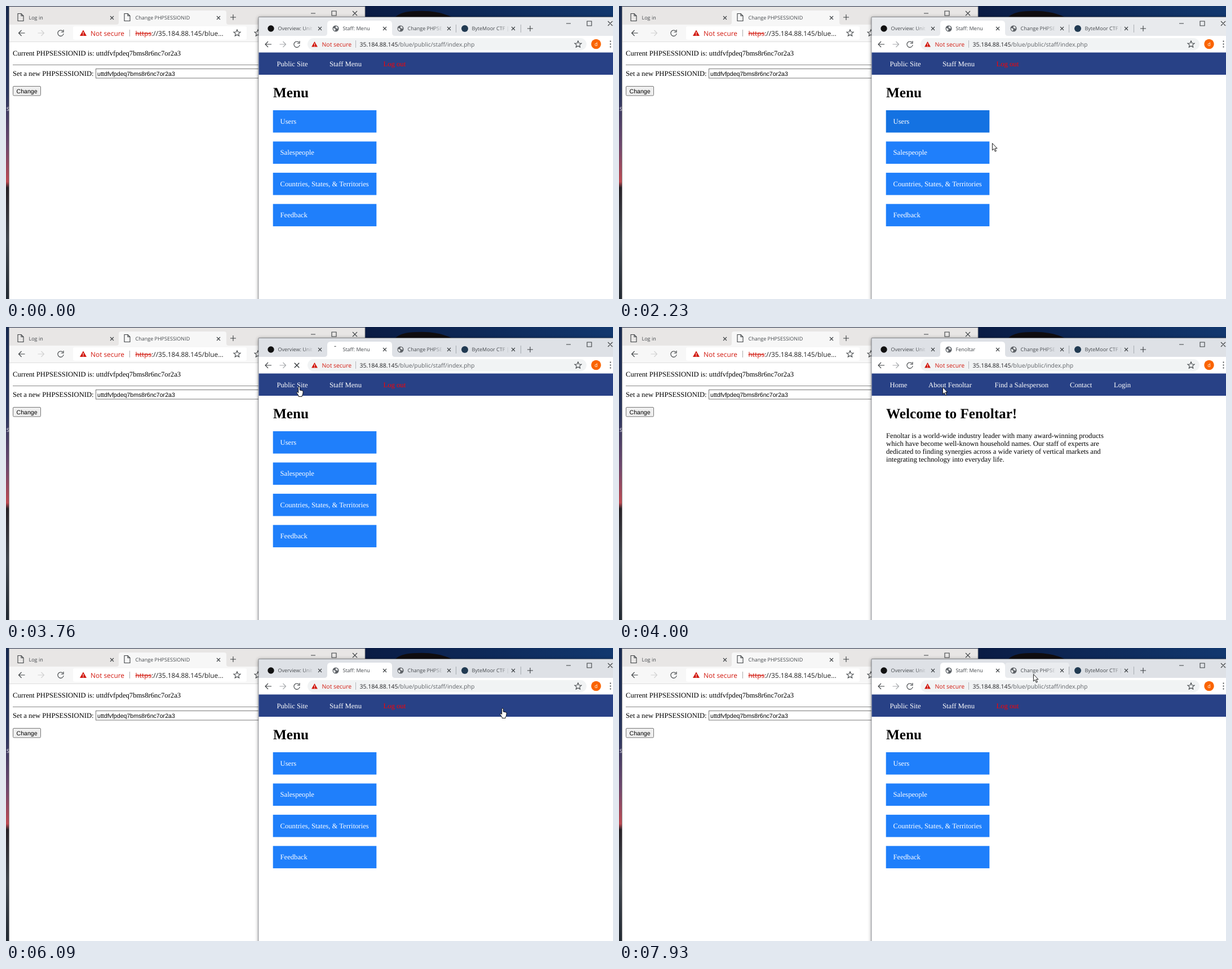
Animation, 1077 px wide and 520 px high, one loop 8000 ms. Source, as an HTML page:

```html
<!DOCTYPE html>
<html lang="en">
<head>
<meta charset="utf-8">
<title>Two browser windows</title>
<style>
  html, body { margin: 0; width: 100%; height: 100%; overflow: hidden; background: #fff; }
  svg { display: block; width: 100vw; height: 100vh; }
  text { white-space: pre; text-rendering: geometricPrecision; font: 12.65px "Liberation Serif", serif; }
  .ui text { font: 9px "Open Sans", sans-serif; fill: #45494d; }
  .ui .addr { font-size: 10.43px; fill: #5f6368; }
  .ui .edge { font-size: 11.9px; fill: #222; }
  .ui .warn { fill: #d2190f; }
  .ui .host { fill: #202124; }
  .ui .struck { fill: #d2190f; text-decoration: line-through; }
  .field text { font: 10.6px "Liberation Sans", sans-serif; }
  h1, .head { font-size: 25.2px; font-weight: bold; }
  .light text { fill: #fff; }
  .light .out { fill: #f00; }
  .line { fill: none; stroke: #3c4043; stroke-width: 1.1; }
  .win { filter: drop-shadow(0 1px 3px #0007); }
</style>
</head>
<body>
<svg viewBox="0 0 1077 520" preserveAspectRatio="none">
  <defs>
    <linearGradient id="sky"><stop offset=".58" stop-color="#0a1b43"/><stop offset="1" stop-color="#12386f"/></linearGradient>
    <linearGradient id="dusk" x2="0" y2="1">
      <stop offset="0" stop-color="#17294e"/><stop offset=".3" stop-color="#2b375f"/>
      <stop offset=".48" stop-color="#70496e"/><stop offset=".6" stop-color="#bd4a52"/>
      <stop offset=".62" stop-color="#282228"/><stop offset=".8" stop-color="#40464e"/><stop offset="1" stop-color="#232a33"/>
    </linearGradient>
    <linearGradient id="fade"><stop offset=".72" stop-color="#45494d"/><stop offset="1" stop-color="#45494d" stop-opacity=".1"/></linearGradient>
    <path id="x" d="M-3-3l6 6m0-6l-6 6"/>
    <path id="plus" d="M-5 0h10M0-5v10"/>
    <path id="back" d="M5.5 0h-11m5-5l-5 5 5 5"/>
    <path id="star" d="M0-6L1.7-2 6-1.7 2.7 1.1 3.7 5.2 0 3-3.7 5.2-2.7 1.1-6-1.7-1.7-2z"/>
    <path id="file" d="M-5-6.5h6l4 4v9h-10zM1-6.5v4h4"/>
    <g id="reload"><path d="M4.2-3A5.2 5.2 0 1 0 5.2 1"/><path d="M5-6v4.2H.8" /></g>
    <g id="alert"><path d="M0-5.5L6 5H-6z" fill="#d2190f"/><path d="M0-1.8v3.2m0 1.2v1.3" stroke="#fff" stroke-width="1.2"/></g>
    <g id="globe"><circle r="5.6" fill="#5f6368"/><path d="M-4.4-.8l3 .6 1.2 2-1.4 2.4q-2.8-1.4-2.8-5M.2-4.2l2.4.6 1.6 3-2.2.6-2.4-1.6z" fill="#f1f3f4"/></g>
    <g id="controls" class="line"><path d="M-41 0h8M-4-4h8v8h-8zM33-4l8 8m0-8l-8 8" style="stroke:inherit"/></g>
  </defs>

  <rect width="1077" height="520" fill="url(#sky)"/>
  <path d="M690 20Q702 9 728 9Q765 7 792 20z" fill="#100d10"/>
  <rect width="6" height="520" fill="url(#dusk)"/>
  <text x="1" y="186" style="font:9px 'Open Sans',sans-serif" fill="#fff">S</text>

  <g class="ui">
    <rect x="5.5" y="1" width="631.5" height="530" fill="#e8e6e5" stroke="#8c8c8c" stroke-width=".8"/>
    <path d="M6 33H196q4 0 4-4V12q0-4 4-4H387q4 0 4 4V29q0 4 4 4H637V64H6z" fill="#f7f7f7"/>
    <rect x="119" y="36" width="308" height="24" rx="3" fill="#fff"/>
    <rect x="6" y="64" width="631" height="456" fill="#fff"/>
    <path d="M6 63.5H448" stroke="#dedede"/>
    <g class="line">
      <use href="#file" x="26" y="20"/><use href="#file" x="215" y="20"/>
      <use href="#x" x="188" y="21"/><use href="#x" x="377" y="21"/><use href="#plus" x="403" y="20"/>
      <use href="#back" x="28" y="48"/><use href="#reload" x="97" y="48"/>
      <use href="#back" transform="translate(62 48) scale(-1 1)" stroke="#d0d0d0"/>
      <use href="#star" x="410" y="48"/><use href="#star" x="447" y="48"/>
    </g>
    <use href="#controls" x="582" y="13" stroke="#777"/>
    <text x="40.5" y="24">Log in</text>
    <text x="229.5" y="24">Change PHPSESSIONID</text>
    <use href="#alert" x="137" y="48"/>
    <text class="edge warn" x="150" y="53">Not secure</text>
    <path d="M219.5 42v12" stroke="#aaa"/>
    <text class="edge" x="229.5" y="53"><tspan class="struck">https</tspan>://35.184.88.145/blue...</text>
  </g>
  <text x="12" y="88">Current PHPSESSIONID is: uttdfvfpdeq7bms8r6nc7or2a3</text>
  <path d="M12 104.5H448" stroke="#888"/>
  <text x="12" y="123.500">Set a new PHPSESSIONID:</text>
  <g class="field">
    <rect x="159.500" y="111.500" width="320" height="16.500" fill="#fff" stroke="#767676"/>
    <text x="162" y="123.500">uttdfvfpdeq7bms8r6nc7or2a3</text>
    <rect x="12.500" y="142.500" width="49" height="16.500" rx="1.500" fill="#efefef" stroke="#767676"/>
    <text x="18.500" y="154.500">Change</text>
  </g>

  <g class="ui">
    <rect id="strip" class="win" x="448" y="19.500" width="640" height="510" fill="#e8eaed"/>
    <path d="M448 19.500H1077M448 20V520" stroke="#66696e" stroke-width=".7"/>
    <path id="glow" d="M685 53V31q0-5 5-5H794q5 0 5 5V53z" fill="#fff" opacity=".35"/>
    <path d="M448.500 53H565q5 0 5-5V32q0-6 6-6H679q6 0 6 6V48q0 5 5 5H1077V520H448.500z" fill="#fff"/>
    <rect id="omni" x="535" y="57" width="495" height="21.500" rx="10.700" fill="#f1f3f4"/>
    <circle cx="470" cy="40" r="5.700" fill="#111"/>
    <use id="icon" href="#globe" x="585" y="40"/>
    <path id="spin" d="M-1.500-5.500A5.700 5.700 0 0 1 1.500-5.500" class="line"/>
    <use href="#globe" x="700" y="40"/>
    <circle cx="814" cy="40" r="6" fill="#213a52"/>
    <text x="482.500" y="43" fill="url(#fade)" style="fill:url(#fade)">Overview: Unit</text>
    <text id="title" x="597.500" y="43"></text>
    <text x="712.500" y="43" style="fill:url(#fade)">Change PHPSE</text>
    <text x="826.500" y="43" style="fill:url(#fade)">ByteMoor CTF |</text>
    <g class="line">
      <use href="#x" x="557" y="40"/><use href="#x" x="672" y="40"/><use href="#x" x="786" y="40"/><use href="#x" x="900" y="40"/>
      <use href="#plus" x="930" y="40"/>
      <path d="M798.500 33v14M913.500 33v14" stroke="#999da3" stroke-width=".8"/>
      <use href="#back" x="465.500" y="68"/>
      <use href="#back" transform="translate(491 68) scale(-1 1)" stroke="#a5a8ab"/>
      <use id="reloadBtn" href="#reload" x="516" y="68"/>
      <use id="stopBtn" href="#x" transform="translate(516 68) scale(1.400)"/>
      <use href="#star" x="1015" y="68"/>
    </g>
    <use id="frameBtns" href="#controls" x="1035" y="31"/>
    <use href="#alert" transform="translate(547.500 68) scale(.9)"/>
    <text class="addr warn" x="560.500" y="71.500">Not secure</text>
    <path d="M620.500 61v13" stroke="#b5b8bc"/>
    <text class="addr" x="627.500" y="71.500"><tspan class="host">35.184.88.145</tspan><tspan id="route"></tspan></text>
    <circle cx="1047" cy="67.500" r="8.700" fill="#fa6400"/>
    <text x="1047" y="71" text-anchor="middle" style="fill:#fff">d</text>
    <path d="M1072.500 62.500v.1m0 4.900v.1m0 4.900v.1" stroke="#3c4043" stroke-width="2.200" stroke-linecap="round"/>
  </g>
  <rect x="448.500" y="82.500" width="629" height="39.500" fill="#284186"/>

  <g id="menuPage" class="light">
    <text x="480.500" y="107">Public Site</text>
    <text x="574" y="107">Staff Menu</text>
    <text class="out" x="669.500" y="107">Log out</text>
    <text class="head" x="474" y="162" style="fill:#000">Menu</text>
  </g>
  <g id="homePage">
    <g class="light">
      <text x="480.500" y="107">Home</text>
      <text x="549" y="107">About Fenoltar</text>
      <text x="666.500" y="107">Find a Salesperson</text>
      <text x="800" y="107">Contact</text>
      <text x="878" y="107">Login</text>
    </g>
    <text class="head" x="474" y="162">Welcome to Fenoltar!</text>
    <text x="474" y="196.500">Fenoltar is a world-wide industry leader with many award-winning products</text>
    <text x="474" y="210.800">which have become well-known household names. Our staff of experts are</text>
    <text x="474" y="225">dedicated to finding synergies across a wide variety of vertical markets and</text>
    <text x="474" y="239.300">integrating technology into everyday life.</text>
  </g>

  <g id="pointer" stroke="#000" stroke-width=".9" stroke-linejoin="round" fill="#fff">
    <path id="arrow" d="M.4.6V13L3.300 10.400 5.300 15.200 7.300 14.400 5.300 9.700H9z"/>
    <path id="hand" d="M-1.300 1.300a1.300 1.300 0 0 1 2.600 0V6l4.500 1q1.500.4 1.400 2l-.6 4.400-1.400 2.400V17.500h-6V16L-3.900 11.200q-.9-1.400.2-1.900 1-.4 1.800.7l.6.800z"/>
    <path id="beam" d="M-3-7h2l1 1 1-1h2M0-6V6M-3 7h2l1-1 1 1h2" fill="none"/>
  </g>
</svg>
<script>
const LOOP = 8000;
const $ = id => document.getElementById(id);
const show = (id, on) => $(id).style.display = on ? '' : 'none';

// Menu buttons
const buttons = ['Users', 'Salespeople', 'Countries, States, & Territories', 'Feedback'].map((label, i) => {
  const add = (tag, attrs) => {
    const el = document.createElementNS('http://www.w3.org/2000/svg', tag);
    for (const key in attrs) el.setAttribute(key, attrs[key]);
    return $('menuPage').appendChild(el);
  };
  const y = 185 + i * 55.45;
  const box = add('rect', { x: 473.7, y, width: 183.6, height: 39.6, fill: '#1f7ffb' });
  add('text', { x: 486.5, y: y + 24 }).textContent = label;
  return box;
});

// Pointer positions, each held until the next one
const stops = [[0, -60, -60, 'arrow']];
function glide(from, to, steps, x, y, kind = 'arrow') {
  const [, x0, y0] = stops.at(-1);
  for (let i = 1; i <= steps; i++) {
    const k = i / steps;
    stops.push([from + (to - from) * (i - 1) / (steps - 1 || 1),
      x0 + (x - x0) * k, y0 + (y - y0) * k, i < steps ? 'arrow' : kind]);
  }
}
const jump = (t, x, y, kind) => glide(t, t, 1, x, y, kind);

jump(360, 983, 444);
jump(440, 928, 432);
jump(520, 954, 419);
glide(1510, 1760, 4, 750, 253);
jump(2060, 700, 235);
jump(2140, 640, 210, 'hand');
jump(2230, 662, 243);
glide(2290, 2680, 6, 656, 161);
glide(3000, 3380, 6, 520, 106, 'hand');
glide(3995, 4380, 6, 844, 107);
glide(4690, 4840, 3, 879, 112);
glide(5160, 5240, 2, 878, 111);
jump(5700, 881, 107, 'hand');
jump(6860, 870, 114);
glide(6940, 7240, 5, 775, 69, 'beam');
glide(7400, 7780, 6, 749, 36);
jump(7930, 735, 46);

function draw(t) {
  const [, x, y, kind] = stops.findLast(s => s[0] <= t);
  const active = t >= 3610;
  const home = t >= 3915 && t < 6010;
  const loading = active && t < 3915 || t >= 5930 && t < 6010;

  $('pointer').setAttribute('transform', `translate(${x} ${y})`);
  for (const k of ['arrow', 'hand', 'beam']) show(k, k === kind);

  show('homePage', home);
  show('menuPage', !home);
  buttons[0].setAttribute('fill', t >= 2140 && t < 2290 ? '#1472e2' : '#1f7ffb');

  $('title').textContent = home ? 'Fenoltar' : 'Staff: Menu';
  $('route').textContent = home ? '/blue/public/index.php' : '/blue/public/staff/index.php';
  show('icon', !loading);
  show('reloadBtn', !loading);
  show('stopBtn', loading);
  show('spin', loading);
  $('spin').setAttribute('transform', `translate(584 40) rotate(${(t - 3760) / 2})`);

  $('strip').setAttribute('fill', active ? '#dee1e6' : '#e8eaed');
  $('frameBtns').setAttribute('stroke', active ? '#000' : '#85888c');
  $('omni').setAttribute('fill', kind === 'beam' ? '#e8eaed' : '#f1f3f4');
  show('glow', y > 26 && y < 53 && x > 685 && x < 799);
}

function tick() {
  draw(performance.now() % LOOP);
  requestAnimationFrame(tick);
}
tick();
</script>
</body>
</html>
```
